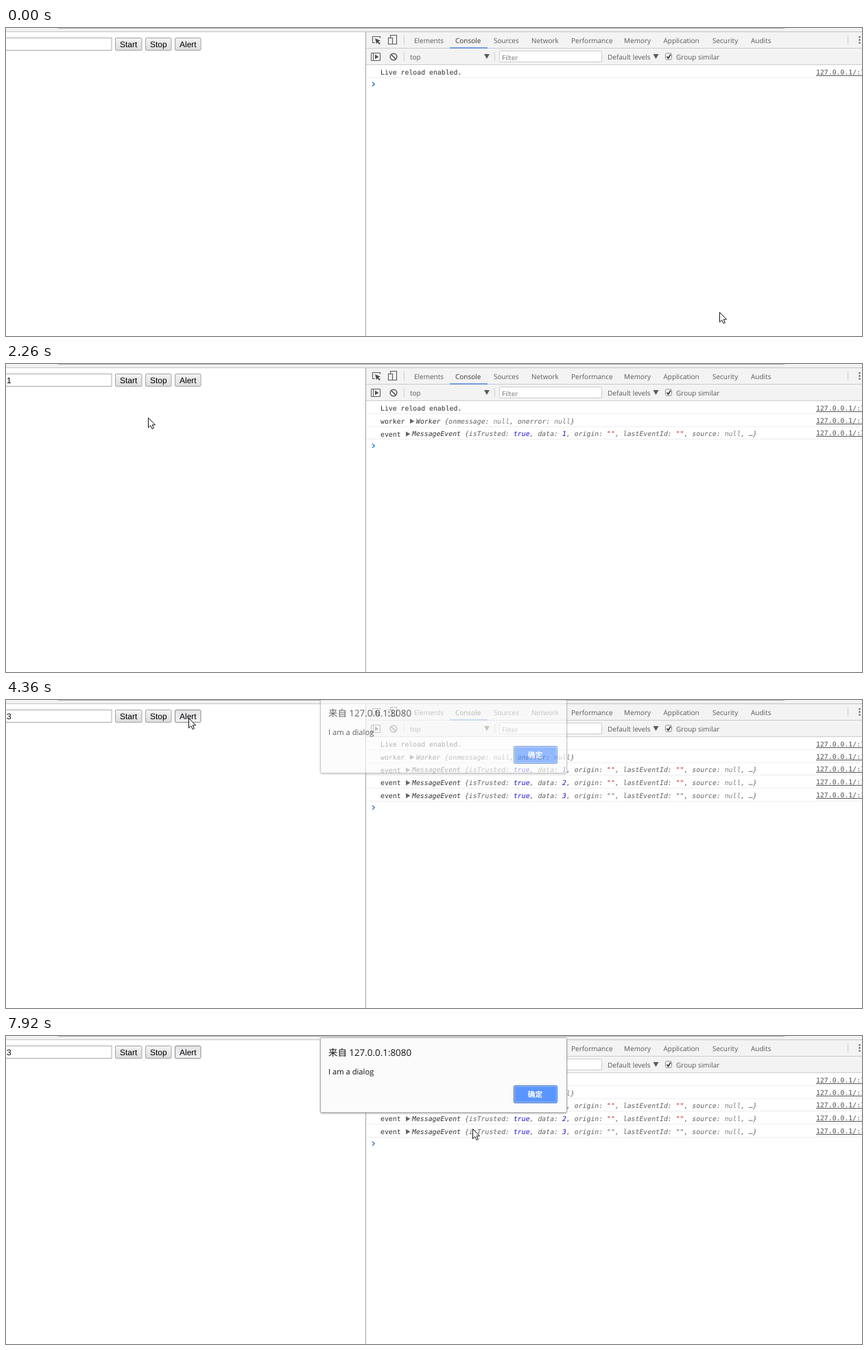
Animation of 1248 by 449 pixels, one loop 8000 ms. Source, as an HTML page:

```html
<!DOCTYPE html>
<html lang="en">
<head>
<meta charset="utf-8">
<title>Worker console demo</title>
<style>
  html, body { margin: 0; width: 100%; height: 100%; overflow: hidden; background: #fff; }
  svg { display: block; width: 1248px; height: 449px; }
  text { white-space: pre; text-rendering: geometricPrecision; fill: #5a5a5a;
    font: 10px 'Open Sans', 'Noto Sans CJK SC', 'Noto Sans CJK', sans-serif; }
  .page { font: 12px 'Liberation Sans', Arial, sans-serif; fill: #000; }
  .log text { font: 9.83px 'DejaVu Sans Mono', monospace; fill: #303030; }
  .log .obj { font-style: italic; }
  .log .url { fill: #545454; text-decoration: underline; }
  .key { fill: #606060; }
  .num { fill: #1c10cf; }
  .str { fill: #c41a16; }
  .nul { fill: #808080; }
  .line { fill: none; stroke: #5a5a5a; }
  .sep { stroke: #ccc; }
  .btn rect { fill: url(#face); stroke: #a3a3a3; }
  .btn.hover rect { fill: url(#lit); stroke: #767676; }
  .btn.down rect { fill: url(#sunk); stroke: #8a8a8a; }
</style>
</head>
<body>
<svg viewBox="0 0 1248 449">
  <defs>
    <linearGradient id="face" x2="0" y2="1"><stop stop-color="#f4f4f4"/><stop offset="1" stop-color="#dcdcdc"/></linearGradient>
    <linearGradient id="lit" x2="0" y2="1"><stop stop-color="#f8f8f8"/><stop offset="1" stop-color="#e2e2e2"/></linearGradient>
    <linearGradient id="sunk" x2="0" y2="1"><stop stop-color="#e3e3e6"/><stop offset="1" stop-color="#f1f1f4"/></linearGradient>
    <filter id="shadow" x="-5%" y="-10%" width="110%" height="125%">
      <feDropShadow dx="0" dy="1" stdDeviation="1.2" flood-opacity=".35"/>
    </filter>
  </defs>
  <rect width="1248" height="449" fill="#fff"/>
  <rect width="1248" height="5" fill="#f2f2f2"/>
  <path d="M76 .5H1135" stroke="#b0b0b0"/>
  <path d="M0 5.5H1248" stroke="#c4c4c4"/>

  <rect x="-10.5" y="14.5" width="164.5" height="18" fill="#fff" stroke="#a9a9a9"/>
  <text id="count" class="page" x="1" y="28"></text>
  <g id="buttons"></g>

  <g id="tools">
    <path d="M525 6H1248V53H525Z" fill="#f3f3f3"/>
    <path class="sep" d="M525 29.5H1248M525 53.5H1248M580.5 11V24M580.5 35V48M712.5 35V48M1227.5 11V24"/>
    <path d="M524.5 6V449" stroke="#a3a3a3"/>
    <path d="M647 29H702" stroke="#4d87e0" stroke-width="1.6"/>
    <path class="line" d="M538 21.5H534.5V12.5H545.5V15" stroke-width="1.1"/>
    <path d="M538 15L546 18.5L542.8 19.4L545.8 22.6L544.4 24L541.4 20.8L540.2 23.6Z" fill="#4c4c4c"/>
    <path class="line" d="M560.5 14V10.5H569.5V23.5H564M557.5 14.5H563.5V23.5H557.5Z" stroke-width="1.1"/>
    <path class="line" d="M532.5 36.5H545.5V47.5H532.5ZM535.5 36.5V47.5"/>
    <path d="M538 38.8L543.3 42L538 45.2Z" fill="#4c4c4c"/>
    <circle class="line" cx="565" cy="42" r="4.8" stroke-width="1.5"/>
    <path class="line" d="M561.6 38.6L568.4 45.4" stroke-width="1.5"/>
    <path d="M697 38H705L701 45ZM943.5 38H951.5L947.5 45Z" fill="#5a5a5a"/>
    <rect x="719.5" y="33.5" width="149" height="16" rx="1" fill="#fff" stroke="#ccc"/>
    <rect x="961.5" y="37" width="9" height="9" rx="1.5" fill="#fff" stroke="#8a8a8a"/>
    <path d="M963.3 41.5L965.5 44L969 38.8" class="line" style="stroke:#333" stroke-width="1.7"/>
    <path d="M1244.5 12V23" stroke="#5a5a5a" stroke-width="2.2" stroke-dasharray="2.2 2.1"/>
  </g>

  <g class="log" id="log"></g>
  <path id="prompt" d="M534 -3L537.2 0L534 3" fill="none" stroke-width="1.5"/>

  <g id="dialog">
    <rect x="458.5" y="2.5" width="359" height="109" rx="2" fill="#fbfbfb" stroke="#adadad" filter="url(#shadow)"/>
    <text x="470" y="28.5" style="font-size:13.4px;fill:#111">来自 127.0.0.1:8080</text>
    <text x="470" y="56" style="font-size:11.2px;fill:#111">I am a dialog</text>
    <rect x="740.5" y="72.5" width="63" height="25" rx="1.5" fill="#5a96ff" stroke="#3a6fc8"/>
    <rect x="741.5" y="73.5" width="61" height="23" fill="none" stroke="#a4c6ff"/>
    <text x="760.8" y="89" style="font-size:10.8px;font-weight:700;fill:#fff">确定</text>
  </g>

  <path id="cursor" d="M.5 .5V14.8L3.8 11.7L6 16.6L8.4 15.6L6.2 10.8H10.5Z" fill="#fff" stroke="#111" stroke-linejoin="round"/>
</svg>
<script>
const $ = id => document.getElementById(id);
const span = (cls, s) => `<tspan class="${cls}">${s}</tspan>`;
const text = (x, y, s, cls = '') => `<text x="${x}" y="${y}" class="${cls}">${s}</text>`;

// toolbar labels
const tabs = { Elements: 595, Sources: 711, Network: 766, Performance: 824, Memory: 901,
  Application: 958.5, Security: 1030, Audits: 1086 };
$('tools').innerHTML += Object.entries(tabs).map(([s, x]) => text(x, 21.5, s)).join('') +
  '<text x="655" y="21.5" style="fill:#333">Console</text>' +
  text(589, 45.5, 'top') + text(723, 46.5, '<tspan fill="#757575">Filter</tspan>') +
  text(877, 45.5, 'Default levels') + text(977, 45.5, 'Group similar');

const buttons = [['Start', 159, 39], ['Stop', 203, 38], ['Alert', 246, 38]];
$('buttons').innerHTML = buttons.map(([s, x, w]) =>
  `<g class="btn"><rect x="${x + .5}" y="14.5" width="${w - .5}" height="18" rx="1.5"/>${text(x + 7, 28, s, 'page')}</g>`).join('');
const buttonEls = [...$('buttons').children];

// console rows and the time each one appears
const pitch = 18.7;
const rowTimes = [0, 1170, 2170, 3190, 4200];

function message(n) {
  const quotes = span(n < 3 ? 'str' : 'key', '""');
  return 'MessageEvent ' + span('key', '{isTrusted: ') + span('num', 'true') + span('key', ', data: ') +
    span('num', n) + span('key', ', origin: ') + quotes + span('key', ', lastEventId: ') + quotes +
    span('key', ', source: ') + span('nul', 'null') + span('key', ', …}');
}

function row(i) {
  const y = 68 + pitch * i;
  const label = ['Live reload enabled.', 'worker'][i] || 'event';
  const x = i === 1 ? 598 : 592;
  const nul = span('nul', 'null');
  const body = i === 1
    ? 'Worker ' + span('key', '{onmessage: ') + nul + span('key', ', onerror: ') + nul + span('key', '}')
    : message(i - 1);
  const object = i ? `<path d="M${x - 9} ${y - 7}l6.5 3.7l-6.5 3.7Z" fill="#666"/>` + text(x, y, body, 'obj') : '';
  const edge = Math.round(y + 4) + .5;
  return `<g><path d="M525 ${edge}H1248" stroke="#eee"/>${text(546, y + .3, label)}${object}` +
    text(1181, Math.floor(y - .5 * (i > 0)), '127.0.0.1/:' + (i ? 18 : 74), 'url') + '</g>';
}
$('log').innerHTML = rowTimes.map((_, i) => row(i)).join('');
const rowEls = [...$('log').children];

// pointer moves: first step, last step, step count, end point
const moves = [
  [70, 840, 12, 174, 28],
  [1240, 1550, 5, 196, 84],
  [1850, 1930, 2, 199, 83],
  [2090, 2260, 3, 207, 78],
  [2340, 2950, 9, 228, 28],
  [3350, 3660, 5, 266, 26],
  [4440, 4900, 7, 448, 189],
  [4980, 5060, 2, 538, 199],
  [7770, 7920, 3, 680, 135]
];

function pointer(t) {
  let x = 1040, y = 414;
  for (const [start, end, n, toX, toY] of moves) {
    if (t < start) break;
    const step = Math.floor((t - start) / (end - start) * (n - 1) + .01) + 1;
    let p = Math.min(1, step / n);
    if (n > 9) p = p * p * (3 - 2 * p);
    x += (toX - x) * p;
    y += (toY - y) * p;
  }
  return [Math.round(x), Math.round(y)];
}

const within = (t, a, b) => t >= a && t < b;

function draw(t) {
  const [x, y] = pointer(t);
  $('cursor').setAttribute('transform', `translate(${x} ${y})`);

  const down = [within(t, 1000, 1080), within(t, 3030, 3100), t >= 4120];
  buttonEls.forEach((el, i) => {
    const [, left, w] = buttons[i];
    const hover = within(x, left, left + w) && within(y, 14, 33);
    el.setAttribute('class', 'btn' + (down[i] ? ' down' : hover ? ' hover' : ''));
  });

  const rows = rowTimes.filter(at => t >= at).length;
  rowEls.forEach((el, i) => el.setAttribute('display', i < rows ? 'inline' : 'none'));
  $('count').textContent = rows > 2 ? rows - 2 : '';
  $('prompt').setAttribute('transform', `translate(0 ${63.2 + pitch * rows})`);
  $('prompt').setAttribute('stroke', rows === 3 ? '#267ff5' : '#4a80c0');

  const fade = t < 4200 ? 0 : Math.min(1, .05 + .3 * Math.floor((t - 4200) / 78));
  $('dialog').setAttribute('opacity', fade);
  $('dialog').setAttribute('transform', `translate(0 ${Math.round(-15 * (1 - fade))})`);
}

function frame() {
  draw(performance.now() % 8000);
  requestAnimationFrame(frame);
}
frame();
</script>
</body>
</html>
```
